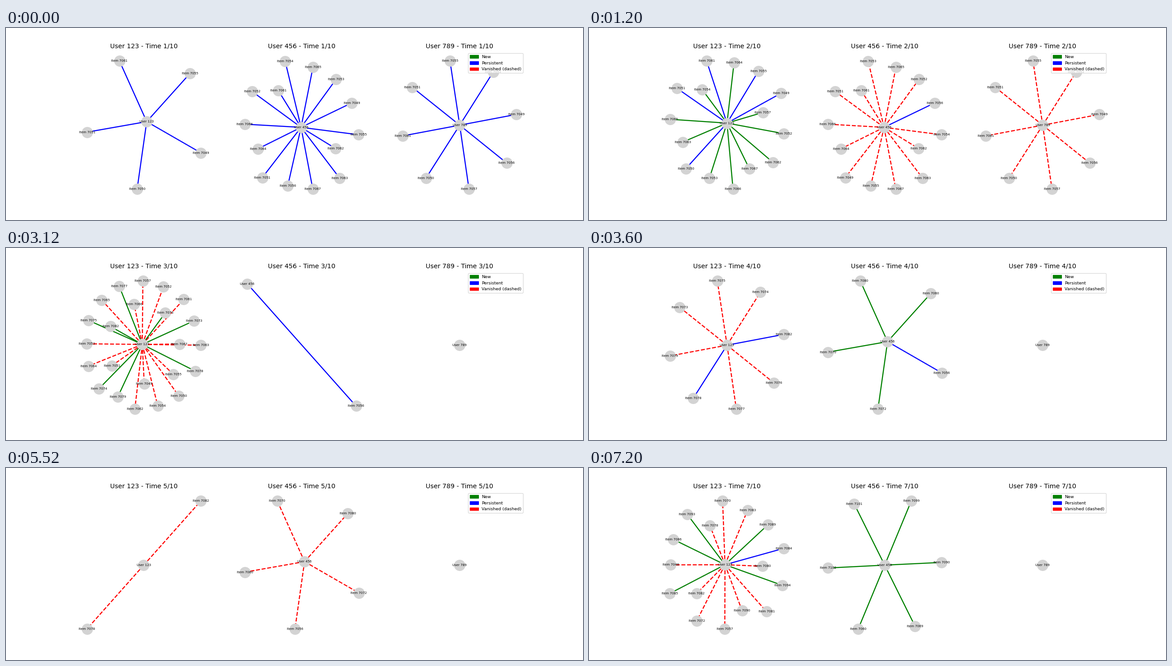
A matplotlib script that plays this animation: 1280 by 427 pixels, repeating every 8 s.

```python
import numpy as np
import matplotlib.pyplot as plt
from matplotlib.animation import FuncAnimation
from matplotlib.patches import Patch

WIDTH, HEIGHT = 1280, 427
DPI = WIDTH / 15
COLORS = {"+": "green", "": "blue", "-": "red"}
USERS = ("User 123", "User 456", "User 789")

# Item numbers (7000 + n) counter-clockwise from the right of each hub;
# "+" marks a new link, "-" a vanished one, no mark a persistent one.
STEPS = [
    ("55 61 51 50 49",
     "55 49 53 65 54 61 52 66 64 51 56 67 63 62",
     "49 54 55 51 61 50 57 56"),
    ("52+ 57+ 49 55 64+ 61 54+ 51 65+ 63+ 50 53+ 66+ 67+ 62+",
     "54- 56 52- 65- 53- 61- 51- 66- 64- 49- 55- 67- 63- 62-",
     "49- 54- 55- 51- 61- 50- 57- 56-"),
    ("63- 67- 73+ 61- 76+ 52- 57- 66- 77+ 65- 82+ 75+ "
     "53- 64- 51- 74+ 79+ 62- 49- 54- 50- 55- 78+",
     "56", ""),
    ("82 74- 75- 73- 79- 78 77- 76-", "60+ 80+ 70+ 72+ 56", ""),
    ("82- 78-", "80- 70- 60- 56- 72-", ""),
    ("83+ 72+ 81+ 82+ 84+ 80+ 70+ 78+ 48+ 90+ 57+", "", ""),
    ("80- 84 89+ 83- 70- 78- 93+ 86+ 48- 85+ 82- 72- 57- 90- 81- 94+",
     "90+ 99+ 101+ 102+ 60+ 69+", ""),
]


def star_layout(leaves, rounds=50):
    """Force-directed star: hub first, then leaves sorted by angle."""
    n = leaves + 1
    if n == 1:
        return np.zeros((1, 2))
    links = np.zeros((n, n))
    links[0, 1:] = links[1:, 0] = 1
    pos = np.random.RandomState(42).rand(n, 2)
    k = np.sqrt(1 / n)
    heat = np.ptp(pos, axis=0).max() * 0.1
    cooling = heat / (rounds + 1)
    for _ in range(rounds):
        delta = pos[:, None] - pos[None]
        dist = np.clip(np.linalg.norm(delta, axis=-1), 0.01, None)
        force = k * k / dist**2 - links * dist / k
        push = np.einsum("ijk,ij->ik", delta, force)
        length = np.linalg.norm(push, axis=-1)
        length = np.where(length < 0.01, 0.1, length)
        move = push * (heat / length)[:, None]
        pos += move
        heat -= cooling
        if np.linalg.norm(move) / n < 1e-4:
            break
    pos -= pos.mean(axis=0)
    pos /= np.abs(pos).max()
    start = np.radians(-14)
    dx, dy = (pos[1:] - pos[0]).T
    order = np.argsort((np.arctan2(dy, dx) - start) % (2 * np.pi))
    return np.vstack([pos[:1], pos[1:][order]])


def view_limits(pos):
    """Box around all links, each padded by 5 %, plus a 5 % margin."""
    if len(pos) == 1:
        return pos[0] - 1, pos[0] + 1
    pad = 0.05 * np.abs(pos[1:] - pos[0])
    low = (np.minimum(pos[1:], pos[0]) - pad).min(axis=0)
    high = (np.maximum(pos[1:], pos[0]) + pad).max(axis=0)
    margin = 0.05 * (high - low)
    return low - margin, high + margin


def draw_star(ax, user, items):
    pos = layouts[len(items)]
    low, high = view_limits(pos)
    names = [user]
    for item, end in zip(items, pos[1:]):
        number = item.rstrip("+-")
        mark = item[len(number):]
        names.append(f"Item {7000 + int(number)}")
        ax.plot(*zip(pos[0], end), color=COLORS[mark], lw=2, zorder=1,
                ls="--" if mark == "-" else "-")
    ax.scatter(*pos.T, s=400, c="lightgray", zorder=2)
    for name, (x, y) in zip(names, pos):
        ax.text(x, y, name, size=6, ha="center", va="center", clip_on=True)
    ax.set_xlim(low[0], high[0])
    ax.set_ylim(low[1], high[1])


def update(i):
    step = i // 3
    for ax, user, items in zip(axes, USERS, STEPS[step]):
        ax.clear()
        ax.axis("off")
        ax.set_title(f"{user} - Time {step + 1}/10", fontsize=12)
        draw_star(ax, user, items.split())
    axes[-1].legend(handles=legend_keys, loc="upper right", fontsize=8)
    return []


plt.rcParams["font.family"] = "DejaVu Sans"
layouts = {n: star_layout(n)
           for n in {len(s.split()) for row in STEPS for s in row}}
legend_keys = [Patch(color="green", label="New"),
               Patch(color="blue", label="Persistent"),
               Patch(color="red", label="Vanished (dashed)")]

fig, axes = plt.subplots(1, 3, figsize=(WIDTH / DPI, HEIGHT / DPI), dpi=DPI)
anim = FuncAnimation(fig, update, frames=20, interval=400, repeat=True,
                     repeat_delay=0, init_func=lambda: [], blit=False)
plt.show()
```
